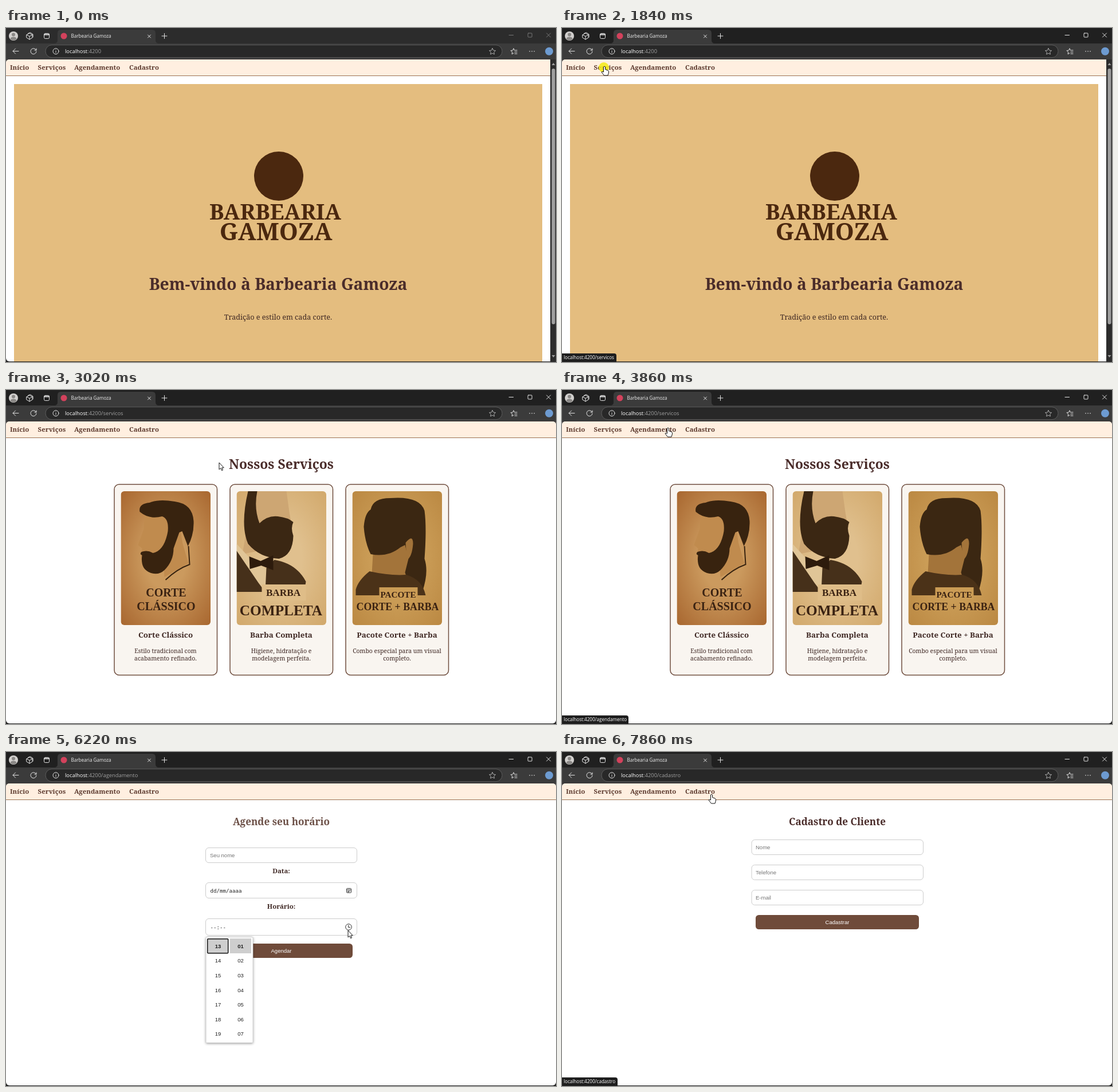
Animation, 960 px wide and 584 px high, one loop 7.99 s. Source, as an HTML page:

```html
<!DOCTYPE html>
<html lang="pt-BR">
<meta charset="utf-8">
<title>Barbearia Gamoza</title>
<style>
html, body { margin: 0; height: 100%; overflow: hidden; background: #202020 }
svg { display: block; width: 960px; height: 584px }
text { font-family: "Open Sans", sans-serif; white-space: pre }
.serif text { font-family: "Noto Serif", serif; fill: #3e2723 }
.serif .b { font-weight: 700 }
.serif .h { font-weight: 700; fill: #4a2c2a }
.serif .brand { font-weight: 700; fill: #4b280f }
.mid { text-anchor: middle }
.form text { font-family: "Liberation Sans", Arial, sans-serif; font-size: 9.52px; fill: #757575 }
.form .mono { font-family: "DejaVu Sans Mono", monospace; font-size: 9.15px; fill: #222 }
.form .w { fill: #fff }
.form .k { fill: #222 }
.art text { font-family: "Liberation Serif", serif; font-weight: 700; text-anchor: middle; fill: #3a2212 }
.line { fill: none; stroke: #e4e4e4; stroke-linecap: round; stroke-linejoin: round }
</style>
<svg viewBox="0 0 960 584">
  <defs>
    <radialGradient id="g0" r=".75"><stop offset=".3" stop-color="#cb9a5e"/><stop offset="1" stop-color="#a5622b"/></radialGradient>
    <radialGradient id="g1" r=".75"><stop offset=".3" stop-color="#e0c08e"/><stop offset="1" stop-color="#d0a668"/></radialGradient>
    <radialGradient id="g2" r=".75"><stop offset=".3" stop-color="#cda05a"/><stop offset="1" stop-color="#b98640"/></radialGradient>
    <clipPath id="photo"><rect width="156.5" height="234" rx="6"/></clipPath>
    <filter id="soft" x="-20%" y="-20%" width="140%" height="140%"><feDropShadow dx="0" dy="1" stdDeviation="2" flood-opacity=".4"/></filter>
  </defs>

  <!-- browser frame -->
  <rect id="bar" width="960" height="40"/>
  <path d="M0 27H84Q90 27 90 21V9Q90 3 96 3H255Q261 3 261 9V21Q261 27 267 27H960V70H0Z" fill="#3b3b3b"/>
  <circle cx="13" cy="14" r="8" fill="#d2d0ce"/>
  <circle cx="13" cy="11.5" r="3" fill="#8a8886"/>
  <path d="M7.5 19Q8 15.5 13 15.5T18.5 19Q13 24 7.5 19Z" fill="#8a8886"/>
  <g class="line">
    <path d="M36 12l5-3 5 3v5l-5 3-5-3zl5 2.5 5-2.5M41 14.5V20M38.5 9.5l4-1.500 4.500 3v5"/>
    <rect x="66.5" y="9.500" width="9" height="9" rx="2"/><path d="M67 11.500h8" stroke-width="2"/>
    <path d="M247.500 12l5 5m0-5l-5 5M272 14h9m-4.500-4.500v9"/>
    <path d="M22 40.500H12l4.500-4.500M12 40.500l4.500 4.500M52.500 38.500A5 5 0 1 0 53 41M53 36v3h-3"/>
    <g id="controls"><path d="M878 12.500h7.500M943.500 9l7 7m0-7l-7 7"/><rect x="911" y="9" width="7" height="7" rx="1"/></g>
  </g>
  <circle cx="101" cy="14" r="5.500" fill="#d3425c"/>
  <text x="113.500" y="17" font-size="8.100" fill="#f0f0f0">Barbearia Gamoza</text>
  <rect id="field" x="69" y="29.700" width="797" height="22" rx="11" stroke="#5c5c5c"/>
  <g class="line">
    <circle cx="87" cy="40.700" r="5"/><path d="M87 40.500v2.500M87 38.300v.1"/>
    <path d="M849 35.500l1.700 3.500 3.800.500-2.800 2.700.7 3.800-3.400-1.800-3.400 1.800.7-3.800-2.800-2.700 3.800-.5z" stroke="#aaa"/>
    <path d="M886 36l1.500 3h4.500M886 36l-1.500 3-3.500.500 2.600 2.600-.6 3.600 3-1.700M888 42h4M888 45h4"/>
    <path d="M914 40.700h.1M918 40.700h.1M922 40.700h.1" stroke-width="1.600"/>
  </g>
  <circle cx="948" cy="40.700" r="7" fill="#6d9bd1"/>
  <text x="103" y="44.200" font-size="9.350" fill="#a0a0a0"><tspan fill="#fff">localhost</tspan>:4200<tspan id="path"></tspan></text>

  <!-- page -->
  <g class="serif">
    <rect y="55" width="960" height="528" rx="6" fill="#fff"/>
    <path d="M0 83V61Q0 55 6 55H954Q960 55 960 61V83Z" fill="#ffefe0"/>
    <rect y="83" width="960" height="1" fill="#9a7050"/>
    <g class="b" font-size="11.430" id="links"></g>

    <g id="home">
      <rect x="950" y="55" width="10" height="529" fill="#2c2c2c"/>
      <rect x="952.500" y="71" width="6" height="447" rx="3" fill="#9f9f9f"/>
      <path d="M952.500 65h6l-3-4zM952.500 572h6l-3 4z" fill="#9f9f9f"/>
      <rect x="14" y="98" width="922" height="485" fill="#e4bd7f"/>
      <circle cx="476" cy="259" r="43" fill="#4b280f"/>
      <g class="mid">
        <text class="brand" x="470" y="335" font-size="38">BARBEARIA</text>
        <text class="brand" x="471" y="371" font-size="42">GAMOZA</text>
      </g>
      <text class="mid h" x="475" y="458" font-size="28.200">Bem-vindo à Barbearia Gamoza</text>
      <text class="mid" x="475" y="510" font-size="12.600">Tradição e estilo em cada corte.</text>
    </g>

    <g id="services">
      <text class="mid h" x="480.500" y="138" font-size="22.860">Nossos Serviços</text>
      <g id="cards"></g>
      <g id="art" class="art">
        <g transform="translate(200.500 177)" clip-path="url(#photo)">
          <rect width="157" height="234" fill="url(#g0)"/>
          <path d="M42 40L40 66 30 94 37 100 35 120 75 132 76 150 118 126 108 92 100 44Z" fill="#c08b4e"/>
          <path d="M33 36Q30 22 50 20 66 13 94 18 125 22 127 52 128 76 117 96L107 70 102 72 92 100Q92 122 76 138 64 149 48 141 34 134 37 112 32 110 36 106 46 102 56 108 76 104 82 70 84 48 72 44 50 50 33 36Z" fill="#38230f"/>
          <path d="M118 96L120 128Q98 136 78 155" fill="none" stroke="#38230f" stroke-width="2"/>
          <text x="79" y="184" font-size="20">CORTE</text>
          <text x="79" y="208" font-size="20">CLÁSSICO</text>
        </g>
        <g transform="translate(402.500 177)" clip-path="url(#photo)">
          <rect width="157" height="234" fill="url(#g1)"/>
          <path d="M28 0H87L92 36 96 60 60 100 10 110 22 40Z" fill="#cda673"/>
          <path d="M20 0H36Q30 30 40 56 54 42 72 44 90 46 99 54 94 64 99 78 98 112 74 118 40 116 20 92 6 60 20 0Z" fill="#3b2713"/>
          <path d="M0 92L24 118 56 140 60 170H0Z" fill="#e0c597"/>
          <path d="M0 104L38 160 50 176H0ZM66 120Q104 126 121 158L118 176H50L52 134Z" fill="#46301a"/>
          <path d="M22 114L42 122 64 112V138L43 130 23 136Z" fill="#2d1b0c"/>
          <rect x="44" y="163" width="77" height="28" fill="#dfbd88"/>
          <text x="81.500" y="183" font-size="17.200">BARBA</text>
          <text x="77.500" y="217" font-size="25.300">COMPLETA</text>
        </g>
        <g transform="translate(604.500 177)" clip-path="url(#photo)">
          <rect width="157" height="234" fill="url(#g2)"/>
          <path d="M27 56L36 110 34 144 92 156 116 120 112 60Z" fill="#a3743a"/>
          <path d="M20 62Q22 38 32 32 36 12 66 12 118 8 126 34 130 64 126 118 134 142 122 176 100 172 92 142L98 118 92 94 84 98Q62 116 32 110 22 90 20 62Z" fill="#3b2712"/>
          <path d="M93 90Q106 74 106 92 104 116 95 120Z" fill="#a3743a"/>
          <path d="M6 172Q10 156 30 140 66 148 94 146 122 154 128 182H6Z" fill="#4b3218"/>
          <rect x="47" y="168" width="67" height="21" fill="#cb9c55"/>
          <text x="80" y="186" font-size="15.200">PACOTE</text>
          <text x="79" y="208" font-size="17.800">CORTE + BARBA</text>
        </g>
      </g>
    </g>

    <g id="booking">
      <text class="mid b" x="480.500" y="128" font-size="17.140" style="fill:#6d5148">Agende seu horário</text>
      <g class="mid b" font-size="11.430"><text x="480.500" y="211.500">Data:</text><text x="480.500" y="274">Horário:</text></g>
      <g class="form">
        <g fill="#fff" stroke="#ccc">
          <rect x="348.500" y="167.500" width="264" height="26" rx="5.500"/>
          <rect x="348.500" y="228.500" width="264" height="27" rx="5.500"/>
          <rect x="348.500" y="291.500" width="264" height="29" rx="5.500"/>
        </g>
        <text x="356" y="184">Seu nome</text>
        <text class="mono" x="356.500" y="245.500">dd/mm/aaaa</text>
        <text class="mono" x="356.500" y="309.500">--:--</text>
        <g fill="none" stroke="#333">
          <rect x="594.500" y="238.500" width="8" height="7.500" rx="1"/>
          <path d="M594.500 240.800h8M596 243h5M596 244.700h3"/>
          <circle cx="598" cy="306" r="5.300"/><path d="M597.500 302.500v4h3.500"/>
        </g>
        <rect x="356" y="335" width="249" height="25" rx="5.500" fill="#6f4b3a"/>
        <text class="mid w" x="480.500" y="351">Agendar</text>
        <g id="picker">
          <rect x="349" y="323.500" width="82" height="185" rx="1.500" fill="#fff" stroke="#bbb" stroke-width=".7" filter="url(#soft)"/>
          <rect x="351.700" y="326.700" width="36" height="25" rx="1" fill="#cecece" stroke="#111" stroke-width="1.500"/>
          <rect x="391" y="326" width="37" height="26" fill="#cecece"/>
          <g id="hours" class="mid"></g>
        </g>
      </g>
    </g>

    <g id="signup">
      <text class="mid h" x="480.500" y="128" font-size="17.140">Cadastro de Cliente</text>
      <g class="form">
        <g id="inputs"></g>
        <rect x="338" y="285" width="285" height="25" rx="5.500" fill="#6f4b3a"/>
        <text class="mid w" x="480.500" y="301">Cadastrar</text>
      </g>
    </g>
  </g>

  <g id="status">
    <path fill="#1e1e1e"/>
    <text x="3" y="579" font-size="8.100" fill="#fff"></text>
  </g>
  <circle id="click" r="9" fill="#f5ea14" opacity=".85"/>
  <g id="cursor" fill="#fff" stroke="#111" stroke-linejoin="round">
    <path id="arrow" d="M0 0V12L2.800 9.600 4.600 13.700 6.500 12.900 4.800 8.900H8.300Z"/>
    <path id="hand" d="M-1.500 1Q0 -1 1.500 1V5.500L6 7Q8 8 7.500 11L6 16H-.5L-5 10Q-4.500 8-1.500 10Z"/>
  </g>
</svg>
<script>
const $ = id => document.getElementById(id);
const show = (id, on) => $(id).style.display = on ? '' : 'none';
const within = (t, a, b) => t >= a && t < b;
const label = (x, y, s, cls = '') => `<text x="${x}" y="${y}" class="${cls}">${s}</text>`;

$('links').innerHTML = [[7, 'Início'], [55.5, 'Serviços'], [119, 'Agendamento'], [215, 'Cadastro']]
  .map(([x, s]) => `<text x="${x}" y="72.700" style="fill:#5c3a2e">${s}</text>`).join('');

const cards = [
  ['Corte Clássico', 'Estilo tradicional com', 'acabamento refinado.'],
  ['Barba Completa', 'Higiene, hidratação e', 'modelagem perfeita.'],
  ['Pacote Corte + Barba', 'Combo especial para um visual', 'completo.']
];
$('cards').innerHTML = cards.map(([title, a, b], i) => {
  const x = 189 + 202 * i, mid = x + 89.5;
  return `<rect class="card" x="${x}" y="165" width="179.500" rx="8.500" fill="#f9f5f0" stroke="#6f4e3f" stroke-width="1.500"/>
    <g class="copy mid" font-size="10.450"><g font-size="13.370">${label(mid, 209, title, 'b')}</g>
    ${label(mid, 235.5, a)}${label(mid, 249, b)}</g>`;
}).join('');

$('hours').innerHTML = [...Array(7).keys()].map(i => {
  const y = 342.8 + 25.6 * i, cls = i ? 'k' : 'k b';
  return label(370, y, 13 + i, cls) + label(409.5, y, '0' + (i + 1), cls);
}).join('');

$('inputs').innerHTML = ['Nome', 'Telefone', 'E-mail'].map((s, i) =>
  `<rect x="331" y="${153.5 + 44 * i}" width="299.500" height="26" rx="5.500" fill="#fff" stroke="#ccc"/>` +
  label(338, 169.5 + 44 * i, s)).join('');

// time, x, y of the pointer tip
const path = [
  [520, 452, 495], [1280, 280, 270], [1630, 90, 72], [1840, 74, 67], [2040, 74, 68], [2110, 84, 84],
  [2500, 300, 330], [2700, 540, 300], [3020, 372, 127], [3300, 330, 322], [3600, 250, 42],
  [3860, 185, 66], [4130, 165, 68], [4270, 165, 68], [4480, 445, 314], [4620, 436, 270],
  [4830, 420, 274], [5350, 597, 240], [5600, 598, 242], [5950, 597, 304], [6220, 597, 312],
  [6360, 597, 312], [6950, 270, 75], [7200, 255, 68], [7400, 275, 72], [7600, 261, 74], [7990, 261, 74]
];
function pointer(t) {
  const i = path.findIndex(p => p[0] > t);
  const [t0, x0, y0] = path[i - 1], [t1, x1, y1] = path[i];
  const u = (t - t0) / (t1 - t0), k = u * u * (3 - 2 * u);
  return [x0 + (x1 - x0) * k, y0 + (y1 - y0) * k];
}

const scenes = [['home', 0, ''], ['services', 1910, '/servicos'], ['booking', 4270, '/agendamento'], ['signup', 7860, '/cadastro']];
const hints = [[1700, 2180, '/servicos', 95], [3860, 4340, '/agendamento', 116], [7050, 7990, '/cadastro', 97]];
const clicks = [[1770, 1910], [4130, 4270], [7790, 7860]];

function draw(t) {
  const active = t >= 520;
  $('bar').setAttribute('fill', active ? '#202020' : '#2c2c2c');
  $('controls').setAttribute('stroke', active ? '#e4e4e4' : '#777');
  $('field').setAttribute('fill', within(t, 3530, 3720) ? '#333' : '#282828');

  const now = scenes.findLast(s => t >= s[1]);
  for (const [id] of scenes) show(id, id === now[0]);
  $('path').textContent = now[2];

  const loaded = t >= 1980;
  show('art', loaded);
  document.querySelectorAll('.card').forEach(r => r.setAttribute('height', loaded ? 333.5 : 109.5));
  document.querySelectorAll('.copy').forEach(g => g.setAttribute('transform', `translate(0 ${loaded ? 224 : 0})`));
  show('picker', within(t, 6080, 6500));

  const hint = hints.find(h => within(t, h[0], h[1]));
  show('status', hint);
  if (hint) {
    const [box, text] = $('status').children;
    box.setAttribute('d', `M0 569H${hint[3] - 4}q4 0 4 4V584H0Z`);
    text.textContent = 'localhost:4200' + hint[2];
  }

  show('cursor', active);
  show('click', clicks.some(c => within(t, ...c)));
  if (!active) return;
  const [x, y] = pointer(t), link = x < 268 && y > 56 && y < 80;
  $('cursor').setAttribute('transform', `translate(${x} ${y})`);
  $('click').setAttribute('transform', `translate(${x - 1} ${y + 2})`);
  show('hand', link);
  show('arrow', !link);
}

const start = performance.now();
(function loop() {
  draw((performance.now() - start) % 7990);
  requestAnimationFrame(loop);
})();
</script>
</html>
```
